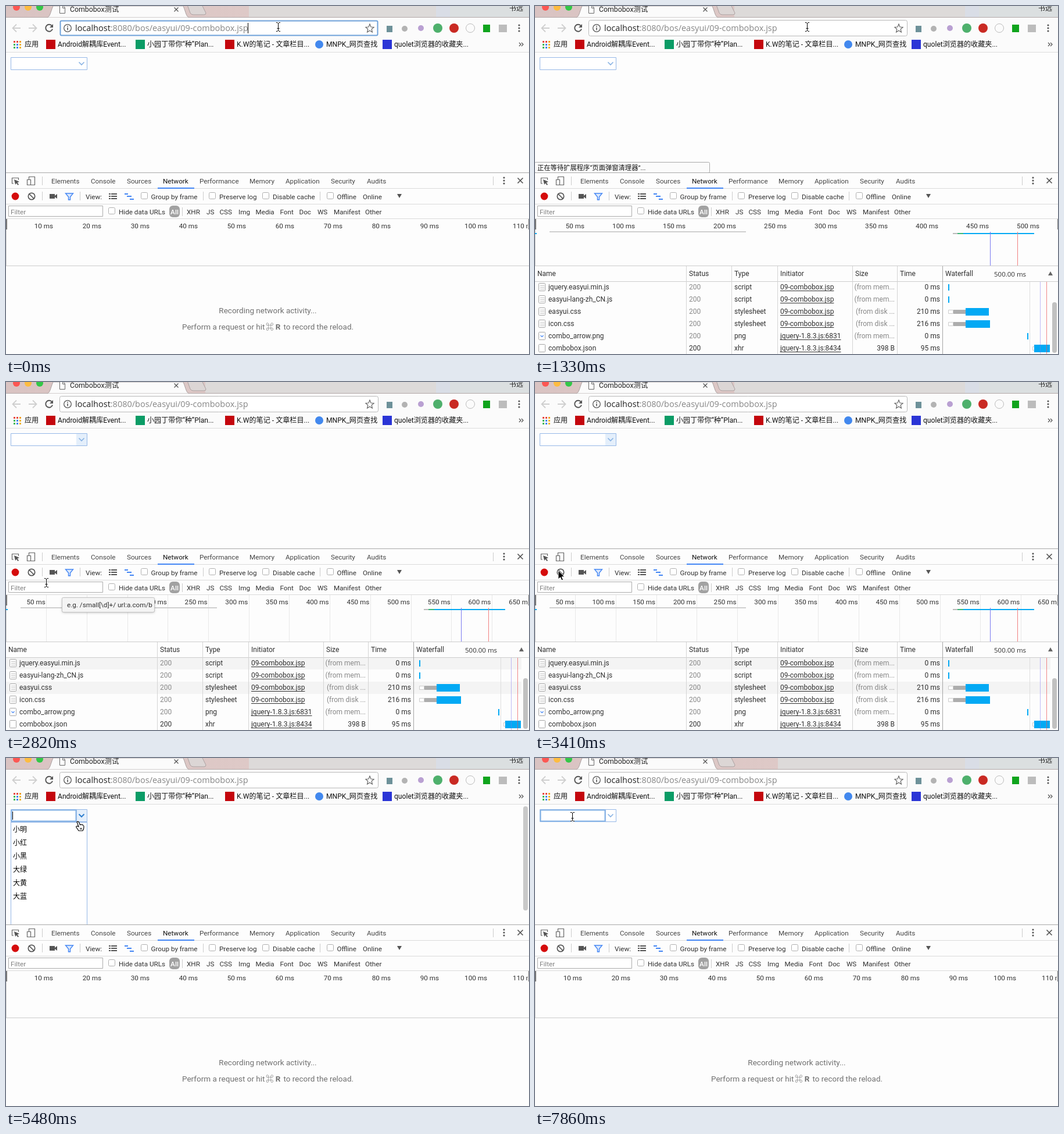
Recreate the animation shown at these times as an HTML page with a canvas. Size 900x598 px, loop 8 s.

```html
<!DOCTYPE html>
<html lang="zh-CN">
<head>
<meta charset="utf-8">
<title>Combobox测试</title>
<style>
html, body { margin: 0; width: 100%; height: 100%; overflow: hidden; background: #fdfdfd; }
canvas { display: block; }
</style>
</head>
<body>
<canvas id="stage" width="900" height="598"></canvas>
<script>
const g = document.getElementById('stage').getContext('2d');
const LOOP = 8000, STEP = 148.2;
const UI = 'Roboto, "Noto Sans CJK SC", "Noto Sans CJK", "DejaVu Sans", sans-serif';
const WIDE = '"Open Sans", sans-serif';
const INK = '#303030', MUTED = '#888', BLUE = '#03a9f4', ACCENT = '#4285f4';

function text(str, x, y, { color = INK, size = 11.7, align = 'left', font = UI, weight = '' } = {}) {
  g.font = `${weight} ${size}px ${font}`;
  g.fillStyle = color;
  g.textAlign = align;
  g.fillText(str, x, y + size * 0.36);
}
function box(x, y, w, h, color) { g.fillStyle = color; g.fillRect(x, y, w, h); }
function frame(x, y, w, h, stroke, fill, radius = 0, width = 1) {
  g.beginPath();
  g.roundRect(x, y, w, h, radius);
  if (fill) { g.fillStyle = fill; g.fill(); }
  if (stroke) { g.strokeStyle = stroke; g.lineWidth = width; g.stroke(); }
}
function path(d, stroke, fill, width = 1, x = 0, y = 0) {
  const p = new Path2D(d);
  g.save();
  g.translate(x, y);
  if (fill) { g.fillStyle = fill; g.fill(p); }
  if (stroke) { g.strokeStyle = stroke; g.lineWidth = width; g.stroke(p); }
  g.restore();
}
function disc(x, y, r, fill, stroke, width = 1.3) {
  g.beginPath();
  g.arc(x, y, r, 0, 7);
  if (fill) { g.fillStyle = fill; g.fill(); }
  if (stroke) { g.strokeStyle = stroke; g.lineWidth = width; g.stroke(); }
}
const hline = (y, color, x = 0, w = 900) => box(x, y, w, 1, color);
const vline = (x, y, h, color) => box(x, y, 1, h, color);
const dots = (x, y) => [-5, 0, 5].forEach(d => disc(x, y + d, 1.6, '#555'));
const cross = (x, y, r, color, width) =>
  path(`M${-r} ${-r}L${r} ${r}M${r} ${-r}L${-r} ${r}`, color, null, width, x, y);

function tabStrip(s, loading) {
  const strip = g.createLinearGradient(0, 0, 418, 0);
  strip.addColorStop(0, '#d9c3c2');
  strip.addColorStop(1, '#dec9c7');
  const pinkEnd = s >= 3 && s < 24 ? 343 : 418;
  box(0, 0, 900, 20, '#dddad9');
  box(0, 0, pinkEnd, 20, strip);
  box(740, 0, 24, 20, loading ? '#dcdad9' : '#d9dde6');
  box(764, 0, 136, 20, loading ? '#d8e7f6' : '#dbdfe0');
  hline(19, '#b3a9a9');
  path('M70 20C76 19 76 12 81 0H305C310 12 310 19 316 20Z', '#aaa0a0', '#fbfbfb');
  path('M312 -2H337L344 12Q344 15 341 15H322Q319 15 317 12Z', '#aaa0a0', '#dcd6d5');
  ['#fc5753', '#fdbc40', '#33c748'].forEach((c, i) => disc(18 + i * 20, 2, 6, c));
  if (loading) {
    g.beginPath();
    g.arc(97, 6, 6, s * 1.05 - 6.3, s * 1.05 - 4.5);
    g.strokeStyle = '#4e7cc4';
    g.lineWidth = 2;
    g.stroke();
  } else path('M92.5 -2V12.5H101.5V3L97 -2M97.5 -2V3.5H101', '#666', '#fff');
  text('Combobox测试', 110, 6, { size: 12.3, color: '#222' });
  cross(293, 6, 3.5, '#555', 1.3);
  text('书远', 866, 4, { size: 12, color: '#222' });
}

function toolbar(loading, focused) {
  box(0, 20, 900, 59, '#fbfbfb');
  hline(79, '#dcdcdc');
  path('M25 38H12M18 31.5L11.5 38L18 44.5M39 38H52M46 31.5L52.5 38L46 44.5', '#cfcfcf', null, 1.8);
  if (loading) cross(74, 38, 5.5, '#555', 1.9);
  else {
    path('M79 34A6 6 0 1 0 80 39.5', '#555', null, 1.9);
    path('M81 31V37H75Z', null, '#555');
  }
  if (focused) frame(93.5, 25.5, 546, 25, '#6fa1d9', '#fff', 2, 2);
  else frame(92.5, 24.5, 548, 27, '#b9b9b9', '#fff', 3);
  disc(106, 38, 6.3, null, '#555');
  box(105.2, 37, 1.6, 4.5, '#555');
  box(105.2, 34, 1.6, 1.7, '#555');
  const url = { size: 14.5, font: WIDE };
  text('localhost', 119, 38, { ...url, color: '#222' });
  const hostWidth = g.measureText('localhost').width;
  text(':8080/bos/easyui/09-combobox.jsp', 119 + hostWidth, 38, { ...url, color: '#858585' });
  if (focused) vline(416, 29, 18, '#000');
  path('M626 31L628 36L633 36.4L629.2 39.8L630.4 45L626 42.2L621.6 45L622.8 39.8L619 36.4L624 36Z', '#666', null, 1.2);
  box(655, 34, 10, 11, '#6d9199');
  disc(686, 39, 5, '#b3b3b3');
  disc(714, 38, 5, '#b9a0d2');
  disc(743, 38, 8, '#4eb06c');
  disc(771, 38, 8, '#c92a23');
  disc(799, 38, 7.5, '#fbfbfb', '#bdbdbd', 1);
  box(821, 32, 12, 13, '#10a41d');
  box(848, 32, 14, 13, '#bcbcbc');
  dots(883, 38);
}

function bookmarks() {
  const apps = ['#e8453c', '#e8453c', '#f0a020', '#3cba54', '#4285f4', '#f0b428', '#3cba54', '#4285f4', '#f0b428'];
  apps.forEach((c, i) => box(13 + i % 3 * 5, 60 + Math.floor(i / 3) * 5, 3, 3, c));
  box(69, 58, 16, 16, '#c4060d');
  box(223, 58, 16, 16, '#0b9c66');
  box(377, 58, 16, 16, '#c4060d');
  disc(539, 66, 7, '#4288ee');
  box(648, 58, 16, 16, '#2b35d6');
  [['应用', 32], ['Android解耦库Event...', 89], ['小园丁带你“种”Plan...', 243], ['K.W的笔记 - 文章栏目...', 397],
   ['MNPK_网页查找', 551], ['quolet浏览器的收藏夹...', 668]]
    .forEach(([name, x]) => text(name, x, 66, { size: 12.1, color: '#111' }));
  path('M883 63L886 66L883 69M887 63L890 66L887 69', '#555', null, 1.3);
}

function combobox({ hover, open, focused, value, caret }) {
  frame(8.5, 88.5, 131, 21, '#95b8e7', '#fff');
  if (hover || open) box(121, 89, 18, 20, '#e4effb');
  if (focused) {
    frame(9.5, 89.5, 111, 19, '#86b4e6', null, 1, 2);
    vline(121, 89, 20, '#95b8e7');
  }
  path('M125.5 96.5L130 101L134.5 96.5', open ? '#2e7fd0' : '#8ab4e4', null, open ? 2 : 1.7);
  text(value, 12, 99, { size: 12, color: '#000' });
  if (caret) vline(11, 92, 14, '#000');
}

function dropdown(active) {
  box(9, 110, 130, 176, '#fff');
  vline(8, 110, 176, '#95b8e7');
  vline(139, 110, 176, '#95b8e7');
  hline(110, '#95b8e7', 8, 132);
  if (active >= 0) box(9, 111 + active * 23, 130, 23, '#e2edfb');
  ['小明', '小红', '小黑', '大绿', '大黄', '大蓝']
    .forEach((name, i) => text(name, 12, 122.5 + i * 23, { size: 12, color: '#000' }));
  frame(890, 83, 8, 179, null, '#c9c9c9', 4);
}

function devtools() {
  box(0, 286, 900, 312, '#fdfdfd');
  hline(286, '#a8a8a8');
  [313, 340, 365].forEach(y => hline(y, '#dadada'));
  path('M13 305H10.5V295.5H21.5V299', '#666', null, 1.2);
  path('M14 298L23 302L19.5 303.5L22 306.5L20.5 308L18 304.5L16 307Z', null, '#555');
  path('M39.5 298V293.5H49.5V307.5H43M36.5 298.5H42.5V307.5H36.5Z', '#666', null, 1.2);
  [[62, 293], [838, 293], [62, 319], [127, 319], [339, 319], [540, 319], [303, 346]]
    .forEach(([x, y]) => vline(x, y, 15, '#ccc'));
  [['Elements', 78], ['Console', 146], ['Sources', 208], ['Network', 270], ['Performance', 333], ['Memory', 419],
   ['Application', 481], ['Security', 559], ['Audits', 621]]
    .forEach(([name, x]) => text(name, x, 300.5, { color: name === 'Network' ? '#111' : '#444' }));
  box(261, 312, 63, 2, ACCENT);
  dots(857, 300);
  cross(885, 300, 4.5, '#555', 1.7);

  disc(16, 327, 6.4, '#d50c0c');
  disc(44, 327, 5.7, null, '#555', 1.7);
  path('M40 323L48 331', '#555', null, 1.7);
  path('M75 323H84V326L88 323V331L84 328V331H75Z', null, '#555');
  path('M102.5 322H115.5L110.5 328V333H107.5V328Z', ACCENT, '#dce9fd', 1.4);
  [322, 326, 330].forEach(y => { box(177, y, 3, 2, '#555'); box(181, y, 10, 2, '#555'); });
  [[204, 6, 322], [208, 8, 326], [213, 7, 331]].forEach(([x, w, y]) => box(x, y, w, 2, ACCENT));
  [[232, 320], [349, 320], [441, 320], [552, 320], [176, 346]]
    .forEach(([x, y]) => frame(x + .5, y + .5, 11, 11, '#b0b0b0', '#fff', 2));
  [['View:', 137], ['Group by frame', 249.5], ['Preserve log', 367], ['Disable cache', 459], ['Offline', 569.5], ['Online', 614]]
    .forEach(([name, x]) => text(name, x, 327.5));
  path('M673 323H681L677 330Z', null, '#555');

  frame(4.5, 343.5, 162, 18, '#acacac', '#fff');
  text('Filter', 8, 353.5, { color: '#808080' });
  frame(281, 343, 18, 20, null, '#a2a2a2', 6);
  text('All', 290, 353.5, { color: '#fff', align: 'center', weight: 500 });
  [['Hide data URLs', 194], ['XHR', 311], ['JS', 345], ['CSS', 367.5], ['Img', 400], ['Media', 429.5], ['Font', 471.5],
   ['Doc', 504.5], ['WS', 536], ['Manifest', 564], ['Other', 618]]
    .forEach(([name, x]) => text(name, x, 353.5));
}

function overview(gap, unit, lines) {
  for (let i = 1; gap * i < 930; i++) {
    if (lines) vline(Math.floor(gap * i), 366, 80, '#e8e8e8');
    text(`${unit * i} ms`, gap * i - 2, 378, { align: 'right' });
  }
  hline(446, '#ccc');
  vline(0, 384, 62, '#d0d0d0');
  box(0, 366, 2, 18, '#777');
  box(898, 366, 2, 18, '#fdfdfd');
  vline(899, 366, 18, '#777');
}

const LINK = '09-combobox.jsp';
const LOADING = [
  [LINK, 200, 'document', 'Other', '807 B', '201 ms'],
  ['easyui.css', '(pending)', 'stylesheet', LINK, '0 B', 'Pending'],
  ['icon.css', '(pending)', 'stylesheet', LINK, '0 B', 'Pending'],
  ['jquery-1.8.3.js', 200, 'script', LINK, '(from mem...', '0 ms'],
  ['jquery.easyui.min.js', 200, 'script', LINK, '(from mem...', 'Pending']
];
const LOADED = [
  ['jquery.easyui.min.js', 200, 'script', LINK, '(from mem...', '0 ms'],
  ['easyui-lang-zh_CN.js', 200, 'script', LINK, '(from mem...', '0 ms'],
  ['easyui.css', 200, 'stylesheet', LINK, '(from disk ...', '210 ms'],
  ['icon.css', 200, 'stylesheet', LINK, '(from disk ...', '216 ms'],
  ['combo_arrow.png', 200, 'png', 'jquery-1.8.3.js:6831', '(from mem...', '0 ms'],
  ['combobox.json', 200, 'xhr', 'jquery-1.8.3.js:8434', '398 B', '95 ms']
];

function table(rows, top, zebra) {
  rows.forEach(([name, status, type, origin, size, time], i) => {
    const y = top + i * 21, opt = { size: 12 };
    const dim = { size: 12, color: MUTED };
    const first = type === 'document';
    const live = first || type === 'xhr';
    if (first) box(0, y - 10, 900, 20, '#dbebf9');
    else if (zebra && (i === 0 || i === 2)) box(0, y - 10, 887, 21, '#f4f4f4');
    frame(6.5, y - 6.5, 11, 13, '#a5a5a5', '#fff', 1);
    if (type === 'png') path('M-2.5 -1L0 1.5L2.5 -1', ACCENT, null, 1.2, 12, y);
    else if (type !== 'xhr') [-3, 0, 3].forEach(d => hline(y + d, '#c4c4c4', 9, 7));
    text(name, 23, y, opt);
    text(status, 265, y, live ? opt : dim);
    text(type, 343, y, opt);
    text(origin, 422, y, first ? dim : opt);
    if (!first) hline(y + 6, INK, 422, g.measureText(origin).width);
    text(size, 619, y, { ...(size[0] === '(' ? dim : opt), align: 'right' });
    text(time, 697, y, { ...(time === 'Pending' ? dim : opt), align: 'right' });
  });
  box(0, 447, 900, 26, '#fdfdfd');
  hline(473, '#ccc');
  [260, 338, 417, 546, 623].forEach(x => vline(x, 447, 151, '#d4d4d4'));
  vline(701, 447, 151, '#a5a5a5');
  [['Name', 4], ['Status', 265], ['Type', 343], ['Initiator', 422], ['Size', 551], ['Time', 628], ['Waterfall', 706]]
    .forEach(([name, x]) => text(name, x, 460, { size: 12 }));
}

function sortMark(label, x) {
  text(label, x, 461, { size: 11.5, font: WIDE });
  box(881, 448, 19, 24, '#fdfdfd');
  path('M883 463H891L887 456Z', null, '#666');
}

function loadingLog(count) {
  table(LOADING.slice(0, count), 484);
  sortMark('100.00 ms', 840);
  box(1, 390, 12, 2, BLUE);
  box(702, 478, 8, 13, BLUE);
  [474, 516, 558].forEach(y => vline(801, y, 20, '#d5dce2'));
  if (count > 3) box(741, 542, 2, 11, BLUE);
}

function loadedLog(zebra) {
  table(LOADED, 483, zebra);
  sortMark('500.00 ms', 790);
  box(0, 390, 3, 2, BLUE);
  box(25, 387, 338, 2, '#cfcfcf');
  box(719, 390, 8, 2, '#bbb');
  box(727, 390, 10, 2, '#3cb878');
  box(737, 390, 122, 2, BLUE);
  vline(783, 388, 58, '#7a7af0');
  vline(830, 388, 58, '#f08080');
  [483, 504].forEach(y => box(711, y - 5, 2, 11, BLUE));
  [[525, 781], [546, 783]].forEach(([y, end]) => {
    frame(711.5, y - 2.5, 8, 6, '#ccc', '#fff');
    box(720, y - 3, 21, 7, '#adadad');
    box(741, y - 6, end - 741, 13, BLUE);
  });
  box(847, 562, 2, 11, BLUE);
  frame(856.5, 585.5, 3, 6, '#ccc', '#fff');
  box(859, 582, 27, 13, BLUE);
  vline(851, 474, 124, '#dedede');
  vline(869, 474, 124, 'rgba(130,120,240,.5)');
  vline(880, 474, 124, 'rgba(235,85,85,.7)');
  frame(890, 509, 8, 87, null, '#c1c1c1', 4);
}

function emptyLog() {
  const opt = { size: 13.5, color: '#707070' };
  text('Recording network activity...', 450.5, 523, { ...opt, align: 'center' });
  text('Perform a request or hit', 303, 551, opt);
  text('⌘ R', 447, 551, { ...opt, weight: 'bold' });
  text('to record the reload.', 477.5, 551, opt);
}

function statusBubble() {
  frame(-.5, 268.5, 301, 18, '#a9a9a9', '#fbfbfb', 2);
  text('正在等待扩展程序“页面弹窗清理器”...', 4, 277.5, { size: 11.3, color: '#111' });
}

function tooltip() {
  g.save();
  g.shadowColor = 'rgba(0,0,0,.3)';
  g.shadowBlur = 4;
  g.shadowOffsetY = 1;
  frame(97, 371, 158, 24, null, '#f4f4f4', 2);
  g.restore();
  frame(96.5, 370.5, 159, 25, '#c4c4c4', null, 2);
  text('e.g. /small[\\d]+/ url:a.com/b', 105, 383);
}

// Pointer waypoints: step, x, y
const ROUTE = [[0, 468, 36], [10, 468, 36], [12, 130, 100], [14, 112, 440], [15, 112, 440], [18, 69, 345], [20, 69, 345],
  [23, 40, 324], [24, 40, 324], [26, 98, 190], [27, 83, 103], [28, 83, 103], [31, 128, 108], [33, 128, 108],
  [37, 127, 117], [38, 127, 117], [39, 100, 166], [42, 100, 166], [48, 64, 101], [54, 64, 101]];

function pointer(s, open) {
  const i = ROUTE.findIndex(p => p[0] > s);
  const [a, x0, y0] = ROUTE[i - 1], [b, x1, y1] = ROUTE[i];
  const k = (s - a) / (b - a);
  const x = Math.round(x0 + (x1 - x0) * k), y = Math.round(y0 + (y1 - y0) * k);
  const inCombo = y > 88 && y < 110 && x > 8 && x < 140;
  const inField = (y < 52 && x < 640) || (inCombo && x < 121) || (y > 342 && y < 362 && x < 167);
  if (inField) {
    const beam = 'M-3 -7.5H-1L.5 -6L2 -7.5H4M.5 -6V6M-3 7.5H-1L.5 6L2 7.5H4M-1.5 2.5H2.5';
    path(beam, '#fff', null, 2.4, x, y);
    path(beam, '#000', null, 1, x, y);
  } else if (open || inCombo) {
    path('M-5 -7Q-3 -9 -1.5 -6.5L.5 -2Q2 -4 3.5 -2Q5 -3 6 -1Q7 -1 7 1L6.5 5L5 8H-2L-6 2Q-7 0 -4 0L-2 1Z', '#000', '#fff', 1.2, x, y);
    path('M1 3V6M3 3V6', '#000', null, 1, x, y);
  } else path('M0 0V15L3.6 11.7L6 17L8.5 16L6.2 10.8H11Z', '#fff', '#000', 1, x, y);
}

function draw(s) {
  const loading = s >= 3 && s < 9, loaded = s >= 9 && s < 24, open = s >= 33 && s < 43;
  box(0, 0, 900, 598, '#fdfdfd');
  tabStrip(s, loading);
  toolbar(loading, s < 3);
  bookmarks();
  combobox({
    hover: s >= 12 && s < 33, open, focused: s >= 33, caret: open && s < 39,
    value: s < 43 || s > 52 ? '' : s < 52 ? '小黑' : '小'
  });
  if (open) dropdown(s < 38 ? -1 : s < 39 ? 0 : 2);
  if (s >= 3 && s < 10) statusBubble();
  devtools();
  if (loaded) overview(s < 10 ? 87 : 69.7, 50, s >= 10);
  else overview(83, 10);
  if (loaded) loadedLog(s >= 11);
  else if (loading && s > 3) loadingLog(s < 5 ? 1 : 5);
  else emptyLog();
  if (s >= 19 && s < 22) tooltip();
  pointer(s, open);
}

function tick() {
  draw(Math.min(53, Math.floor((performance.now() % LOOP + 8) / STEP)));
  requestAnimationFrame(tick);
}
tick();
</script>
</body>
</html>
```
